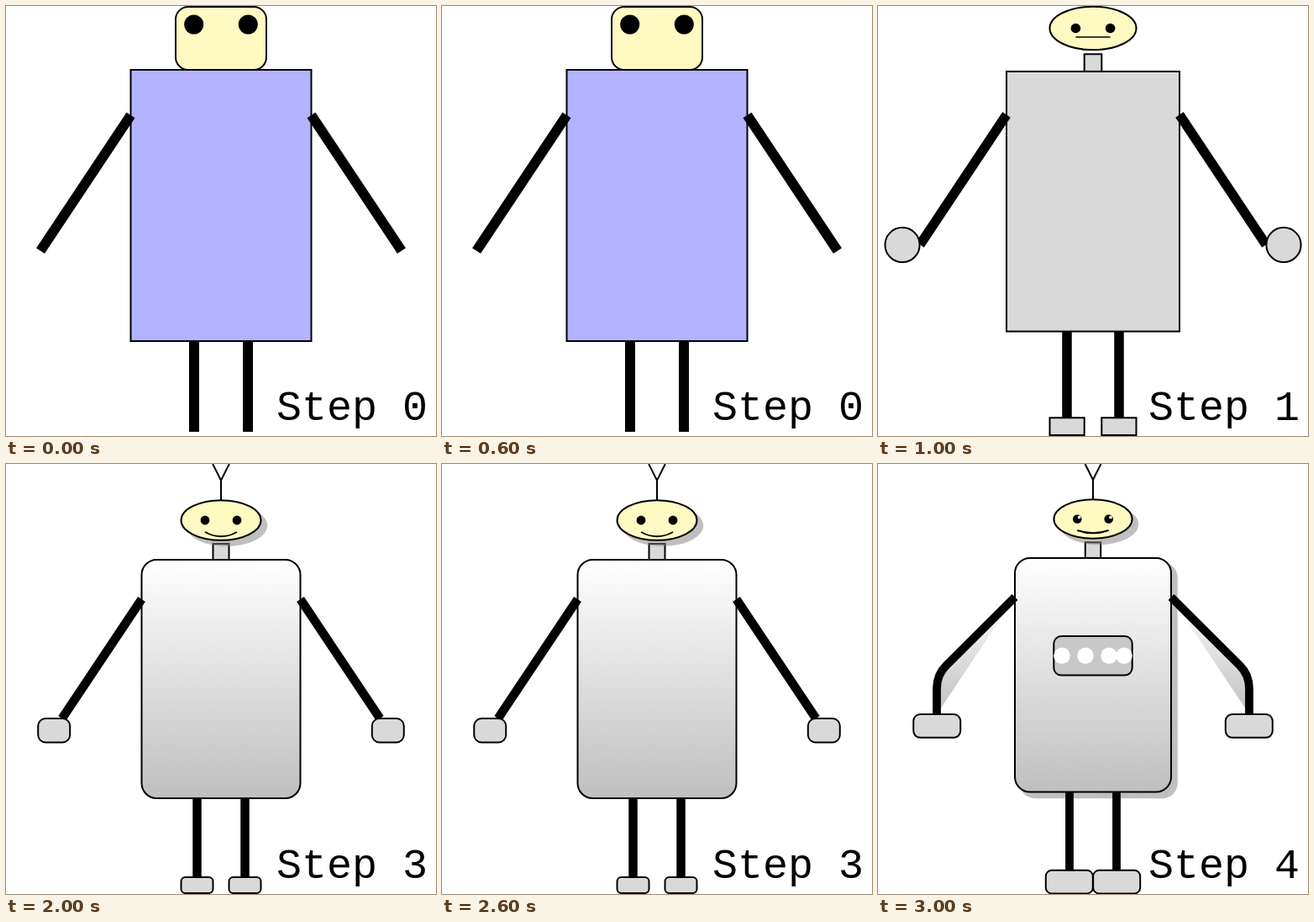
Animation, 512 px wide and 512 px high, one loop 4 s. Source, as an HTML page:

```html
<!DOCTYPE html>
<html lang="en">
<head>
<meta charset="utf-8">
<title>Building a robot step by step</title>
<style>
html, body { margin: 0; width: 100%; height: 100%; overflow: hidden; background: #fff; }
svg { display: block; width: 100vw; height: 100vh; }
g.step { opacity: 0; }
text { font: 50px "Liberation Mono", "Courier New", monospace; white-space: pre; }
</style>
</head>
<body>
<svg id="stage" viewBox="0 0 512 512"></svg>
<script>
const MID = 256, LOOP = 4000;
const SKIN = '#fffac2', GREY = '#d9d9d9', SHADE = 'url(#shade)';
const LABELS = [0, 1, 3, 4];

const line = (d, w = 2) => `<path d="${d}" fill="none" stroke="#000" stroke-width="${w}"/>`;
const box = (x, y, w, h, fill, r = 0) =>
  `<rect x="${x}" y="${y}" width="${w}" height="${h}" rx="${r}" fill="${fill}" stroke="#000" stroke-width="2"/>`;
const oval = (x, y, rx, ry, fill) =>
  `<ellipse cx="${x}" cy="${y}" rx="${rx}" ry="${ry}" fill="${fill}" stroke="#000" stroke-width="2"/>`;
const dot = (x, y, r, fill = '#000') => `<circle cx="${x}" cy="${y}" r="${r}" fill="${fill}"/>`;
const shadow = shape => `<g transform="translate(6.7 6.2)" opacity=".5" fill="#808080">${shape}</g>`;

// The same shape on both sides of the middle axis
const both = shape => `${shape}<g transform="translate(${2 * MID} 0) scale(-1 1)">${shape}</g>`;

const eyes = (dx, y, r) => both(dot(MID - dx, y, r));
const antenna = (top, fork, dx) =>
  line(`M${MID} ${top}V${fork}L${MID - dx} 0M${MID} ${fork}L${MID + dx} 0`);
const smile = (dx, y, depth) =>
  line(`M${MID - dx} ${y}Q${MID} ${y + 2 * depth} ${MID + dx} ${y}`, 1.9);
const shadedHead = (y, rx, ry) =>
  shadow(`<ellipse cx="${MID}" cy="${y}" rx="${rx + 1}" ry="${ry + 1}"/>`) + oval(MID, y, rx, ry, SKIN);

const boxy = () =>
  box(202, 1, 108, 75, SKIN, 15) +
  eyes(32.3, 22, 11.5) +
  box(148.5, 76, 215, 323, '#b3b3ff') +
  both(line('M148.5 130L41 291.5', 12) + line('M224 399V507', 12));

const jointed = () =>
  box(245.7, 57.3, 20.6, 20.6, GREY) +
  oval(MID, 26.5, 51.5, 25.8, SKIN) +
  eyes(20.6, 26.5, 5.8) +
  line('M235.4 37H276.6', 1.6) +
  box(153, 78, 206, 309.5, GREY) +
  both(
    line('M153 129.5L50 284.3', 11.5) + oval(29, 284.4, 20.6, 20.6, GREY) +
    line('M225 387.5V490', 11.5) + box(204.5, 490.3, 41.2, 20.7, GREY));

const smiling = () =>
  antenna(43, 19.5, 9.8) +
  box(246.5, 95, 19, 19, GREY) +
  shadedHead(67, 47.5, 23.8) +
  eyes(19, 67, 5.4) +
  smile(19, 81, 5.3) +
  box(161.5, 114, 189, 284, SHADE, 18) +
  both(
    line('M161.5 161L66.7 303', 10.5) + box(38.2, 303, 38, 28.5, GREY, 9) +
    line('M227.5 398V492', 10.5) + box(208.5, 492, 38, 19, GREY, 5));

const elbow = 'M163 158.5L81.3 239.7Q70 251 70 267V298';
const finished = () =>
  antenna(42, 18.8, 9.4) +
  box(246.8, 93.3, 18.4, 18.6, GREY) +
  shadedHead(65.5, 46.6, 23.3) +
  eyes(18.7, 65.5, 5.3) +
  dot(239.6, 63.4, 1.9, '#fff') + dot(277, 63.4, 1.9, '#fff') +
  smile(18.7, 79, 3.3) +
  shadow('<rect x="162" y="111" width="188" height="281" rx="18"/>') +
  box(163, 112, 186, 278.5, SHADE, 18) +
  box(209.3, 205, 93.4, 46.6, '#c8c8c8', 9) +
  [219, 247, 275, 293].map(x => dot(x, 228.3, 9.8, '#fff')).join('') +
  both(
    `<path d="${elbow}Z" fill="${SHADE}"/>` + line(elbow, 9.8) +
    box(42.2, 298, 56, 27.8, GREY, 8) +
    line('M228 390.5V484', 9.8) + box(199.8, 483.8, 56, 27.6, GREY, 7));

const poses = [boxy, jointed, smiling, finished];
const stage = document.getElementById('stage');
stage.innerHTML =
  `<defs><linearGradient id="shade" x1="0" y1="0" x2="0" y2="1">
    <stop offset="0" stop-color="#fff"/><stop offset="1" stop-color="#bfbfbf"/>
  </linearGradient></defs>` +
  poses.map((draw, i) =>
    `<g class="step">${draw()}<text x="322" y="493">Step ${LABELS[i]}</text></g>`).join('');

stage.querySelectorAll('.step').forEach((step, i) => {
  const keys = poses.map((_, k) =>
    ({ opacity: k === i ? 1 : 0, offset: k / poses.length, easing: 'steps(1, end)' }));
  step.animate([...keys, { opacity: 0, offset: 1 }], { duration: LOOP, iterations: Infinity });
});
</script>
</body>
</html>
```
